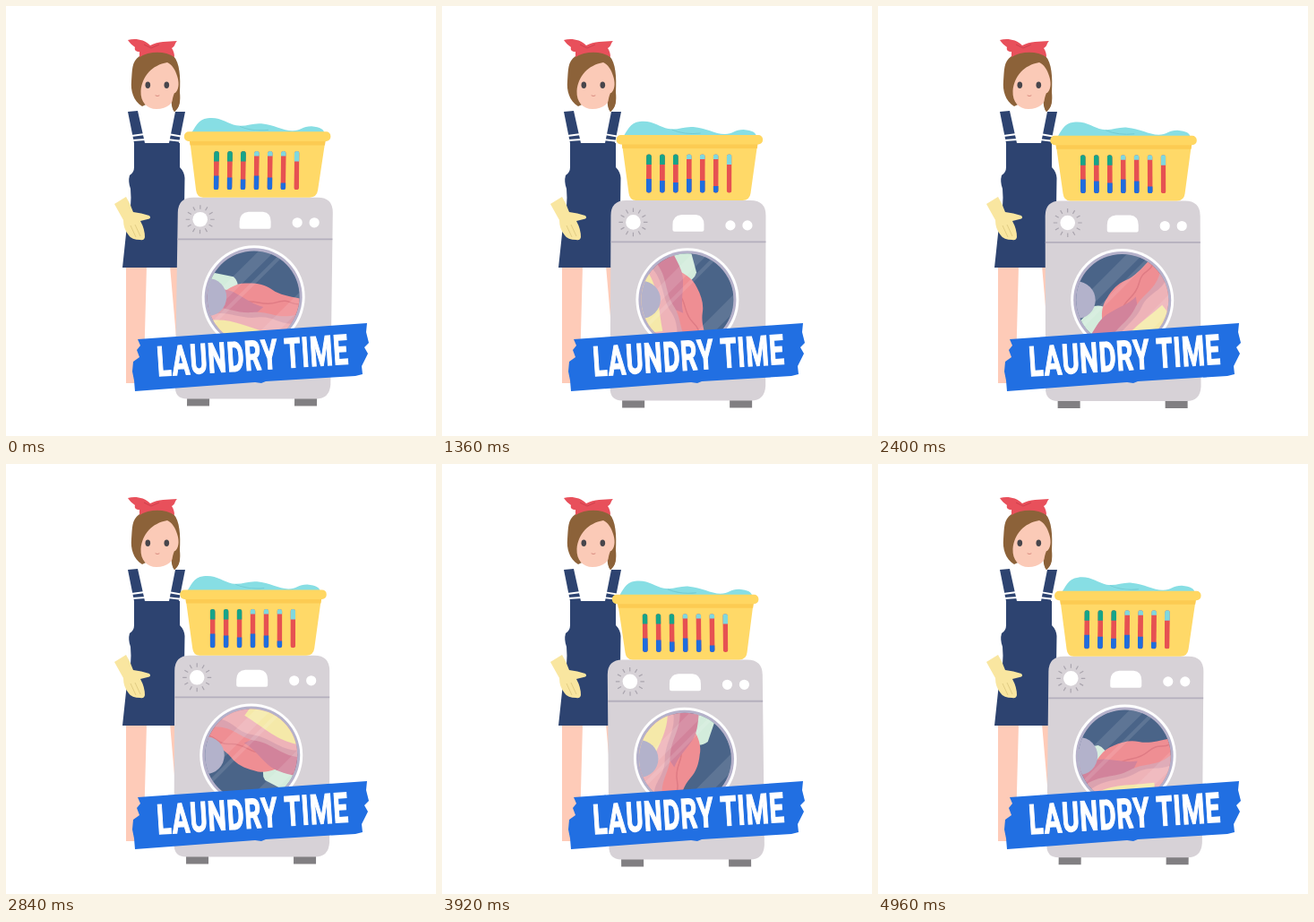
Animation of 480 by 480 pixels, one loop 5 s. Source, as an HTML page:

```html
<!DOCTYPE html>
<html lang="en">
<head>
<meta charset="utf-8">
<title>Laundry time</title>
<style>
html, body { margin: 0; width: 100%; height: 100%; overflow: hidden; background: #fff; }
svg { display: block; width: 100vw; height: 100vh; }
.title {
  font: 700 46px Roboto, "Liberation Sans", sans-serif;
  letter-spacing: 1.5px;
  fill: #fff; stroke: #fff; stroke-width: 1.2px; vector-effect: non-scaling-stroke;
  text-anchor: middle;
}
</style>
</head>
<body>
<svg viewBox="0 0 480 480">
  <defs>
    <clipPath id="glass"><circle r="51.5"/></clipPath>
    <clipPath id="slots"></clipPath>
  </defs>

  <g id="woman">
    <path fill="#fecbb8" d="M134 290H157L153.500 421H134ZM183 290H200V370H190Z"/>
    <path fill="#8c6239" d="M149 56C158 49 180 49 187 56C194 63 195 80 194 96C195 106 194 114 188 118C184 113 184 104 186 96L152 112C142 106 139 94 140 84C141 72 140 62 149 56Z"/>
    <path fill="#fbcab7" d="M180 63C185 65 189 71 191 78C193 84 194 92 189 97C188 108 180 115 168 115C157 115 150 107 150.500 95C152 78 163 66 180 63Z"/>
    <path fill="#8c6239" d="M188 97C196 98 196 110 188 118C184 113 185 104 188 97Z"/>
    <path fill="#e8505b" d="M136 38C144 36 154 37 161 44C170 39 180 40 191 39C188 42 189 45 185 47C187 50 188 53 188 57C178 50 160 50 149 57L149 51C145 51 143 49 144 46C141 44 138 41 136 38Z"/>
    <path fill="none" stroke="#cf3f4c" d="M154 43L162 47L171 43"/>
    <g fill="#48464c"><ellipse cx="158.300" cy="88.300" rx="2.800" ry="3.700"/><ellipse cx="179.300" cy="88.300" rx="2.800" ry="3.700"/></g>
    <path fill="none" stroke="#d98c80" stroke-linecap="round" d="M167 100Q169 101.300 171 100"/>
    <path fill="#2d4370" d="M136 118L147 117L155 153H143ZM189 118L200 118L193 153H182ZM143 153H194V180Q199 185 199.500 192L198 292H130L135 245Q141 225 139 204Q136 196 138 189Q143 186 143 180Z"/>
    <path fill="none" stroke="#fff" stroke-width="1.800" d="M140 145L155 143M141 150L156 149M181 143L198 146M180 149L197 151"/>
    <path fill="#f9e6a0" d="M121 221L134 213Q139 221 142 230Q151 231 160 234Q163 237 158 238L150 240Q155 249 155 258Q154 262 150 261Q140 261 137 256Q131 249 131 239Q126 230 121 221Z"/>
    <path fill="none" stroke="#e2cd84" d="M139 245L145 258M144 244L150 257"/>
  </g>

  <g id="rig">
    <path fill="#817f82" d="M201 437H226V448H201ZM321 437H346V448H321Z"/>
    <path fill="#d7d2d7" d="M205 216H344Q361 216 361 233V424Q360 440 345 440H201Q187 440 187.500 425L188 233Q188 216 205 216Z"/>
    <path stroke="#b4afbd" stroke-width="1.800" d="M188 262.500H361"/>
    <path id="rays" stroke="#aaa5ae" stroke-width="1.200"/>
    <g fill="#fff">
      <circle cx="213" cy="240.500" r="8.300"/>
      <path d="M267 232H283Q292 233 292 243V249Q292 251 290 251H259Q257 251 257 249V243Q257 233 267 232Z"/>
      <circle cx="321.500" cy="244" r="5.600"/>
      <circle cx="340.500" cy="244" r="5.600"/>
    </g>
    <g transform="translate(273.600 327)">
      <circle r="57.500" fill="#fff"/>
      <circle r="54.500" fill="#b5b1ca"/>
      <g clip-path="url(#glass)">
        <circle r="52" fill="#4a6488"/>
        <g id="drum">
          <path fill="#d3ecdc" d="M-54 -25L-24 -21Q-16 -15 -18 0H-54Z"/>
          <path fill="#ef8e93" d="M-40 2C-30 -6 -22 -15 -8 -15C2 -16 12 -15 20 -10C30 -4 40 -4 54 -2V44H-36Z"/>
          <path fill="none" stroke="#df7b84" stroke-width="1.500" d="M-8 6C2 2 12 10 26 4S42 6 52 4"/>
          <path fill="#d2839b" d="M-54 -5C-42 -6 -30 -8 -20 -3C-8 2 0 8 12 10L2 20H-54Z"/>
          <path fill="#dba2af" d="M-54 17C-32 10 -20 20 0 17C20 13 30 25 54 14V60H-54Z"/>
          <path fill="#eeb3b8" d="M-50 24C-30 15 -14 26 6 22S34 32 54 24V60H-50Z"/>
          <path fill="#f5e9a9" d="M-46 29C-22 25 -6 33 22 39L16 60H-46Z"/>
        </g>
        <path fill="#fff" opacity=".11" d="M-52 6L6 -52H24L-52 24ZM-52 33L33 -52H39L-52 39ZM-6 52L52 -6V14L14 52ZM22 52L52 22V30L30 52Z"/>
        <circle cx="-51" r="21" fill="#b3b2cb"/>
      </g>
    </g>

    <path fill="#87dee4" d="M201 146C206 139 209 129 220 128C234 126 242 134 252 136C262 138 270 133 280 134C294 135 304 142 315 142C324 142 326 137 336 137C346 138 350 140 351 146Z"/>
    <path fill="none" stroke="#74cbd3" d="M256 137Q270 143 288 141"/>
    <path fill="#ffd968" d="M200 150H352L344 208Q343 216 335 216H216Q209 216 208 208Z"/>
    <path fill="#fccb52" d="M200 152H352L351.200 158H200.800Z"/>
    <rect x="194" y="143" width="163.500" height="10.500" rx="5" fill="#ffd762"/>
    <g id="fabric" clip-path="url(#slots)"></g>
  </g>

  <g id="banner">
    <path fill="#216fe2" d="M147 372L403 354L402 364L405 376L400 381L404 388L397 402L398 411L390 413L290 419L285 421L278 420L144 430L143 418L141 408L142 397L149 392L146 384L150 379Z"/>
    <text class="title" transform="translate(276.500 406.300) rotate(-3.700) scale(.628 1)">LAUNDRY TIME</text>
  </g>
</svg>
<script>
const LOOP = 5000, STEP = 40, TURNS = 8, SWAYS = 12, BOBS = 16;
const $ = id => document.getElementById(id);

function add(parent, tag, attrs) {
  const el = document.createElementNS('http://www.w3.org/2000/svg', tag);
  for (const key in attrs) el.setAttribute(key, attrs[key]);
  parent.appendChild(el);
}

function buildRays() {
  let d = '';
  for (let i = 0; i < 12; i++) {
    const a = i * Math.PI / 6, c = Math.cos(a), s = Math.sin(a);
    d += `M${213 + 11.5 * c} ${240.5 + 11.5 * s}L${213 + 16 * c} ${240.5 + 16 * s}`;
  }
  $('rays').setAttribute('d', d);
}

function buildSlots() {
  for (let i = 0; i < 7; i++) {
    const x = 227.5 + i * 14.95, top = i < 3 ? 176 : 170 + (i === 6 ? 6 : 0);
    const low = 192 + (i % 3) * 2 + (i > 4 ? 4 : 0);
    const band = (y, end, fill) => add($('fabric'), 'rect', { x, y, width: 6, height: end - y, fill });
    add($('slots'), 'rect', { x, y: 164.5, width: 5.8, height: 43, rx: 2.9 });
    band(164, 208, '#e65152');
    band(164, top, i < 3 ? '#16a488' : '#7fd8de');
    if (i < 6) band(low, 208, '#1f6ddd');
  }
}

const wave = (u, cycles, lag) => Math.cos(2 * Math.PI * (u * cycles - lag));

// Sway leans the machine about a point below the floor; the bob also stretches it.
function draw(ms) {
  const u = Math.floor(ms % LOOP / STEP) * STEP / LOOP;
  const lean = (-0.4 + 4.6 * wave(u, SWAYS, 0.045)) / 310;
  const bob = -wave(u, BOBS, 0.04);
  const stretch = 1 - 0.004 * bob;
  $('rig').setAttribute('transform',
    `matrix(1 0 ${-lean} ${stretch} ${lean * 525} ${448 * (1 - stretch) + 1.5 * bob})`);
  $('drum').setAttribute('transform', `rotate(${360 * TURNS * u + 4})`);
}

buildRays();
buildSlots();
const start = performance.now();
function tick(now) {
  draw(Math.max(0, now - start));
  requestAnimationFrame(tick);
}
draw(0);
requestAnimationFrame(tick);
</script>
</body>
</html>
```
